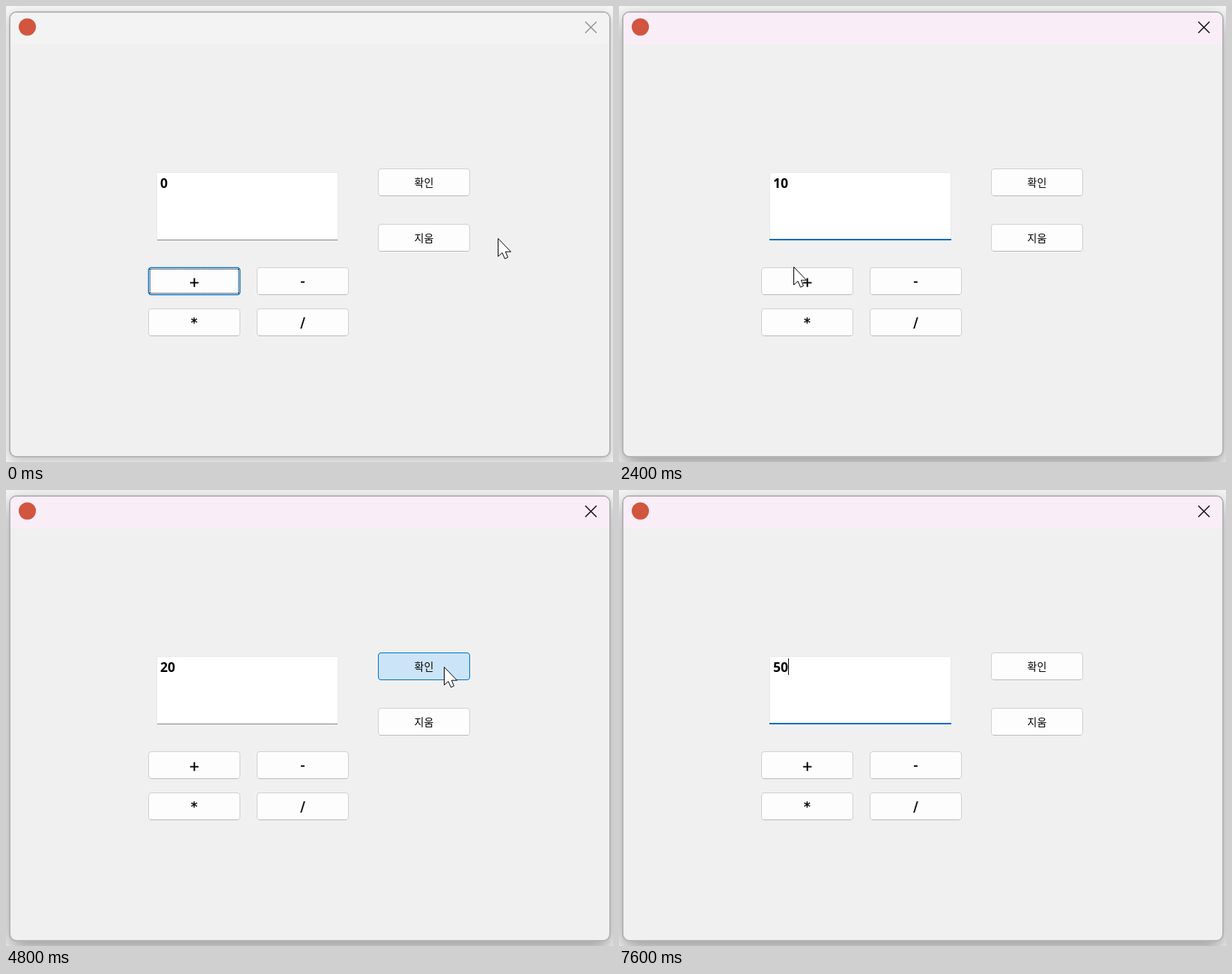
Animation, 811 px wide and 609 px high, one loop 8 s. Source, as an HTML page:

```html
<!DOCTYPE html>
<html lang="ko">
<head>
<meta charset="utf-8">
<title>계산기</title>
<style>
  html, body { margin: 0; width: 100%; height: 100%; overflow: hidden; background: #f6f6f6; }
  #win { position: absolute; left: 4px; top: 7px; width: 800px; height: 592px;
    border: 2px solid #b5b5b5; border-radius: 10px; background: #f0f0f0; overflow: hidden;
    box-shadow: 0 5px 16px rgba(0,0,0,.22); }
  #bar { height: 42px; background: #f3f3f3; }
  #win.active { box-shadow: 0 10px 26px rgba(0,0,0,.38); }
  .active #bar { background: #f9eef8; }
  svg { position: absolute; left: 0; top: 0; width: 811px; height: 609px; }
  .sign { font-family: "DejaVu Sans", sans-serif; font-size: 17.6px; text-anchor: middle; stroke: #000; stroke-width: .4; }
  .word { font-family: "Noto Sans CJK KR", "Noto Sans CJK", sans-serif; font-size: 14px; text-anchor: middle; }
  #num { font-family: "Noto Sans", sans-serif; font-size: 17.6px; font-weight: 600; }
</style>
</head>
<body>
<div id="win"><div id="bar"></div></div>
<svg viewBox="0 0 811 609">
  <circle cx="28.5" cy="28" r="11.5" fill="#d2553f"/>
  <path id="close" d="M774 21l15 15M789 21l-15 15" fill="none" stroke-width="1.5"/>
  <g id="buttons"></g>
  <rect x="201.5" y="222.5" width="242" height="90" rx="1" fill="#fff" stroke="#e9e9e9"/>
  <rect x="202" y="312" width="241" height="1" fill="#868686"/>
  <rect id="line" x="201" y="311" width="243" height="2" fill="#006cc2"/>
  <rect id="sel" x="206" y="225" width="11" height="22" fill="#0078d7"/>
  <text id="num" x="206" y="243"></text>
  <rect id="caret" y="225" height="22"/>
  <path id="arrow" d="M.5 .5V24.5L6 19.5L9.5 27.5L13.5 25.7L10.3 18.2H17.5Z" fill="#fff" stroke="#000"/>
  <path id="beam" d="M-7-12H-2L0-10L2-12H7M0-10V10M-7 12H-2L0 10L2 12H7" fill="none" stroke="#000" stroke-width="2"/>
  <path id="move" d="M0-17L7.5-9.5H2.5V-2.5H9.5V-8L17 0L9.5 8V2.5H2.5V9.5H7.5L0 17L-7.5 9.5H-2.5V2.5H-9.5V8L-17 0L-9.5-8V-2.5H-2.5V-9.5H-7.5Z" fill="#fff" stroke="#000"/>
</svg>
<script>
const LOOP = 8000, STEP = 1000 / 15, FADE = 180, BLINK = 530;
const $ = id => document.getElementById(id);

const field = { x: 201, y: 222, w: 243, h: 91 };
const buttons = [
  { label: '+', x: 190, y: 349, dy: 25.5 },
  { label: '-', x: 335, y: 349, dy: 24 },
  { label: '*', x: 190, y: 404, dy: 25 },
  { label: '/', x: 335, y: 404, dy: 25 },
  { label: '확인', x: 497, y: 217, dy: 23.5 },
  { label: '지움', x: 497, y: 291, dy: 23.5 }
].map(b => ({ ...b, w: 123, h: 37 }));

// what happens when, in ms
const clicks = [[-500, '+'], [440, 'field'], [2530, '+'], [2970, 'field'],
  [4800, '확인'], [6200, '지움'], [6640, 'field']];
const texts = [[0, '0'], [1200, '1'], [1400, '10'], [2600, '0'], [3670, '2'],
  [3730, '20'], [4870, '30'], [6270, '0'], [7330, '5'], [7600, '50']];

// eased pointer moves: from, to, x, y, drag
const home = [657, 310];
const moves = [
  [30, 420, 222, 243], [530, 660, 0, 250, true],
  [1600, 1870, 180, 269], [2070, 2400, 233, 348], [2430, 2500, 236, 354],
  [2670, 2930, 222, 243], [3000, 3200, 61, 231, true],
  [3920, 3930, 148, 236], [4270, 4750, 585, 236],
  [5050, 5340, 595, 321], [6270, 6670, 269, 256], [6670, 6870, 82, 233, true]
];

const clamp = v => Math.max(0, Math.min(1, v));
const ease = k => k * k * (3 - 2 * k);
const last = (list, t) => list.filter(e => e[0] <= t).pop();
const inside = ([x, y], r) => x >= r.x && x < r.x + r.w && y >= r.y && y < r.y + r.h;
const mix = (a, b, k) => 'rgb(' + a.map((v, i) => Math.round(v + (b[i] - v) * k)) + ')';
const show = (el, on) => el.setAttribute('visibility', on ? 'visible' : 'hidden');
const set = (el, attrs) => { for (const k in attrs) el.setAttribute(k, attrs[k]); };

function add(tag, attrs) {
  const el = document.createElementNS('http://www.w3.org/2000/svg', tag);
  set(el, attrs);
  return $('buttons').appendChild(el);
}

for (const b of buttons) {
  b.face = add('rect', { x: b.x + .5, y: b.y + .5, width: b.w - 1, height: b.h - 1, rx: 3.5 });
  b.edge = add('path', { d: `M${b.x + 3} ${b.y + 36.5}h117`, stroke: '#bababa' });
  b.dots = add('path', { d: `M${b.x + 2} ${b.y + 2.5}h119M${b.x + 2} ${b.y + 34.5}h119M${b.x + 2.5} ${b.y + 3}v31M${b.x + 120.5} ${b.y + 3}v31`,
    stroke: '#000', 'stroke-dasharray': '1 1' });
  add('text', { x: b.x + 61.5, y: b.y + b.dy, class: b.label.length > 1 ? 'word' : 'sign' })
    .textContent = b.label;
}

function pointerAt(t) {
  let [x, y] = home;
  for (const [from, to, x1, y1] of moves) {
    const k = ease(clamp((t - from) / (to - from)));
    x += (x1 - x) * k;
    y += (y1 - y) * k;
  }
  return [Math.round(x), Math.round(y)];
}

// share of the last FADE ms that the pointer spent over the button
function hoverAt(b, t) {
  let n = 0;
  for (let i = 0; i < 9; i++) n += inside(pointerAt(t - i * FADE / 9), b);
  return n / 9;
}

function drawButton(b, t) {
  const [when, owner] = last(clicks, t);
  const focus = last(clicks, t - 60)[1] === b.label;
  const pressed = owner === b.label && t - when < 70;
  const hover = hoverAt(b, t);
  set(b.face, {
    fill: pressed ? 'rgb(204,228,247)' : mix([253, 253, 253], [224, 238, 249], hover),
    stroke: mix([208, 208, 208], [0, 112, 196], focus ? 1 : hover),
    'stroke-width': focus ? 1.5 : 1
  });
  show(b.edge, !focus && hover === 0);
  show(b.dots, focus);
}

function drawField(t) {
  const [clicked, owner] = last(clicks, t);
  const [typed, text] = last(texts, t);
  const sel = moves.some(m => m[4] && t > m[0] + 40 && typed < m[0]);
  const blinkOn = Math.floor((t - Math.max(clicked, typed)) / BLINK) % 2 === 0;
  const glow = clamp((t - 440) / FADE) - clamp((t - 2530) / FADE) + clamp((t - 6640) / FADE);
  $('num').textContent = text;
  set($('num'), { fill: sel ? '#fff' : '#000' });
  set($('line'), { opacity: glow });
  set($('caret'), {
    x: sel ? 206 : 206 + 10 * text.length,
    width: sel ? 2 : 1,
    fill: sel ? '#ff8728' : '#000'
  });
  show($('sel'), sel);
  show($('caret'), owner === 'field' && (sel || blinkOn));
}

function drawPointer(t) {
  const p = pointerAt(t), move = last(moves, t);
  const onEdge = p[0] < 5;
  const dragging = move && move[4] && t < move[1];
  const kind = onEdge ? 'move' : dragging || inside(p, field) ? 'beam' : 'arrow';
  // typing hides the pointer until it moves again
  const hidden = move && !onEdge && last(clicks, t)[1] === 'field' && last(texts, t)[0] > move[1];
  for (const id of ['arrow', 'beam', 'move']) {
    show($(id), id === kind && !hidden);
    set($(id), { transform: `translate(${p})` });
  }
}

function draw(ms) {
  const t = Math.floor((ms + 4) / STEP) * STEP + 4;
  const active = t >= clicks[1][0];
  $('win').className = active ? 'active' : '';
  set($('close'), { stroke: active ? '#111' : '#939393' });
  buttons.forEach(b => drawButton(b, t));
  drawField(t);
  drawPointer(t);
}

const start = performance.now();
function tick() {
  draw((performance.now() - start) % LOOP);
  requestAnimationFrame(tick);
}
tick();
</script>
</body>
</html>
```
